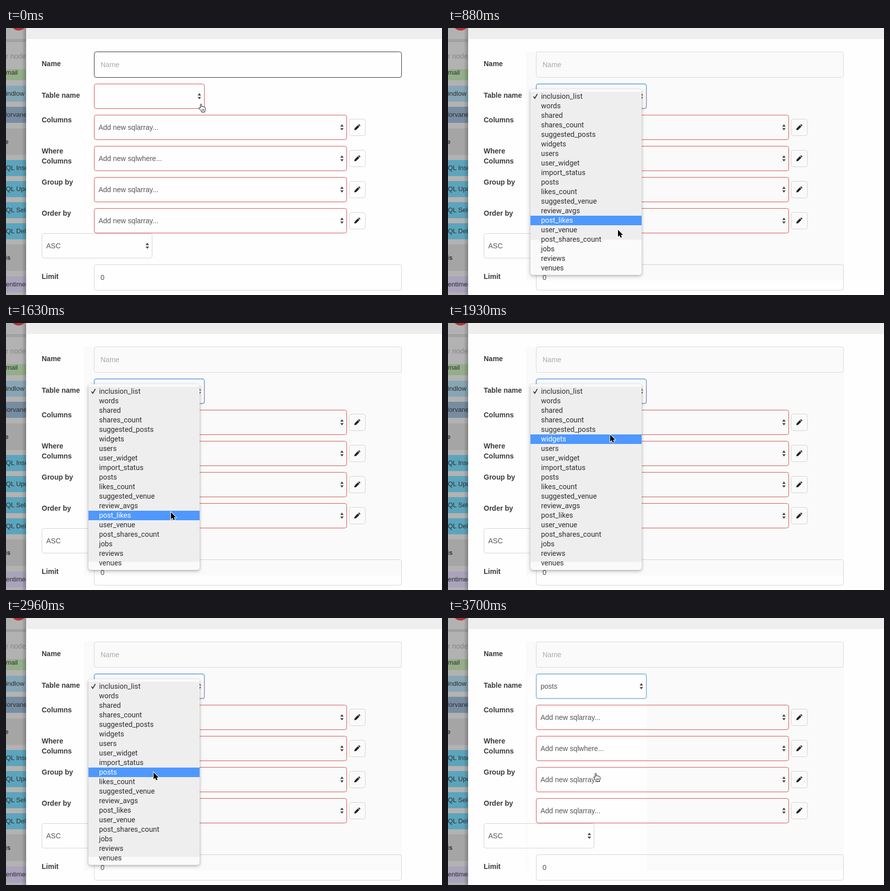
These frames come from a looping animation (867x532 px, 3.84 s). An HTML page:

```html
<!DOCTYPE html>
<html lang="en">
<head>
<meta charset="utf-8">
<title>Choosing a table</title>
<style>
  html, body { margin: 0; width: 100%; height: 100%; overflow: hidden; background: #fefefe; }
  svg { display: block; width: 867px; height: 532px; font: 14px "Liberation Sans", Arial, sans-serif; }
  text { white-space: pre; }
  .label { font-weight: bold; fill: #3a3a3a; }
  .value { fill: #555; }
  .hint { fill: #aaa; }
  .side { font-size: 13px; fill: #2e2e2e; }
  .head { font-size: 13px; font-weight: bold; fill: #2e2e2e; text-anchor: end; }
  .box { fill: none; stroke: #d3d3d3; }
  .need { stroke: #d5514e; }
  #menu text { font: 14.3px Roboto, Inter, sans-serif; fill: #2f2f2f; }
  #menu text.on { fill: #fff; }
  #sheet { filter: drop-shadow(0 2px 3px rgba(0, 0, 0, .32)); }
</style>
</head>
<body>
<svg viewBox="0 0 867 532">
  <defs>
    <linearGradient id="edge"><stop offset="0" stop-opacity="0"/><stop offset="1" stop-opacity=".22"/></linearGradient>
    <clipPath id="sideClip"><rect width="40" height="532"/></clipPath>
    <clipPath id="sheetClip"><rect x="164" y="122" width="221" height="370" rx="5"/></clipPath>
    <path id="updown" d="M-3.4-1.6h6.8L0-6.2zM-3.4 1.4h6.8L0 6z" fill="#444"/>
    <path id="pencil" d="M-5.5 5.5l.8-3.6L1.7-4.5l3 3L-1.8 5zM2.5-5.2l1-.9q.6-.5 1.2 0l1.6 1.6q.6.6 0 1.2l-.9 1z" fill="#222"/>
  </defs>

  <g id="sidebar" clip-path="url(#sideClip)">
    <rect width="40" height="532" fill="#b2b2b2"/>
    <rect y="22" width="40" height="6" fill="#a1a1a1"/>
    <circle cx="25" cy="-11" r="16" fill="#b4343a"/>
    <text y="61" fill="#858585">r nodes</text>
  </g>
  <rect x="31" width="9" height="532" fill="url(#edge)"/>

  <rect x="40" width="827" height="532" fill="#fefefe"/>
  <rect x="40" width="827" height="22" fill="#eee"/>
  <rect id="tint" x="155" y="47" width="632" height="456" fill="#fafafa"/>
  <rect id="cleared" x="158" y="115" width="237" height="388" fill="#fefefe"/>
  <g id="form"></g>
  <rect id="nameBox" class="box" x="175.5" y="47.5" width="611" height="51" rx="4"/>
  <rect id="tableBox" class="box" x="175.5" y="111.5" width="219" height="49" rx="4"/>
  <path id="tableEdge" d="M394.5 126v31q0 3.500-4 3.500H180" fill="none" stroke="#9a76a3"/>
  <use href="#updown" x="384.500" y="136"/>
  <text id="tableValue" class="value" x="184" y="141">posts</text>

  <g id="menu">
    <rect id="sheet" x="164" y="122" width="221" height="370" rx="5" fill="#fafafa"/>
    <g clip-path="url(#sheetClip)">
      <rect id="shade" x="164" y="127" width="221" fill="#eee"/>
      <rect id="bar" x="164" width="221" height="19" fill="#4f98fd"/>
    </g>
    <path id="tick" d="M170 136.500l2.600 3.600 5-8.600" fill="none" stroke-width="1.700"/>
  </g>

  <g id="arrow">
    <path d="M0 0V14l3.200-3 2 4.800 2.500-1-2-4.600h4.300z" stroke="#fff" stroke-width="2" paint-order="stroke"/>
  </g>
  <g id="hand" fill="#fff" stroke="#111">
    <path d="M3.500 1.700Q3.500.5 4.800.5 6 .5 6 1.800V6Q6 5 7.300 5 8.500 5 8.600 6.200 9 5.600 10 5.700 11 5.900 11.100 7q.5-.5 1.300-.2 1.100.4 1.100 1.700V11q0 2-1 3.500v2h-7V15Q4.500 13.500 3 11.800L.8 9Q.3 8 1.200 7.500 2.300 7.200 3.500 8.800z"/>
    <path d="M3.500 8V2M6.500 10.500v3.500M8.500 10.500v3.500M10.500 10.500v3.500" stroke-width=".8"/>
  </g>
</svg>
<script>
const LOOP = 3840, OPEN = 290, FADE = 3400, GONE = 3550, PICKED = 3700;
const ROW = 19, TOP = 127;
const $ = id => document.getElementById(id);

function add(parent, tag, attrs, content) {
  const node = document.createElementNS("http://www.w3.org/2000/svg", tag);
  for (const key in attrs) node.setAttribute(key, attrs[key]);
  if (content) node.textContent = content;
  parent.append(node);
  return node;
}
const write = (parent, cls, x, y, content) => add(parent, "text", { class: cls, x, y }, content);
const box = (x, y, width, height, cls = "box") =>
  add($("form"), "rect", { class: cls, x: x + .5, y: y + .5, width, height, rx: 4 });
const icon = (name, x, y) => add($("form"), "use", { href: "#" + name, x, y });

// Sidebar
const side = $("sidebar");
function card(y, height, fill, title, baseline) {
  add(side, "rect", { y, width: 40, height, fill });
  write(side, "side", -9, baseline, title);
}
function heading(y, title, right) {
  add(side, "rect", { y, width: 40, height: 53, fill: "#a5a5a5" });
  write(side, "head", right, y + 31, title);
}
card(82, 22, "#94ae89", "Email", 93);
card(115, 32, "#87a6b4", "Pindlow", 135);
card(157, 32, "#778ca1", "Morvanel", 177);
heading(200, "Database", 5);
["Insert", "Update", "Select", "Delete"].forEach((verb, i) =>
  card(263 + 42 * i, 32, "#5ca4bc", "SQL " + verb, 283 + 42 * i));
heading(431, "Analysis", 9);
card(495, 32, "#aaa3bb", "Sentiment", 515);

// Form
const form = $("form");
[["Name", 76], ["Table name", 139], ["Columns", 188], ["Where", 250], ["Columns", 270],
 ["Group by", 312], ["Order by", 374], ["Limit", 500]]
  .forEach(([title, y]) => write(form, "label", 71, y, title));
write(form, "hint", 188, 78, "Name");
["array", "where", "array", "array"].forEach((kind, i) => {
  const y = 173 + 62 * i;
  box(175, y, 502, 49, "box need");
  write(form, "value", 184, y + 30, `Add new sql${kind}...`);
  icon("updown", 668, y + 25);
  box(682, y + 8, 32, 33);
  icon("pencil", 698, y + 25);
});
box(71, 409, 219, 49);
write(form, "value", 80, 439, "ASC");
icon("updown", 281, 434);
box(175, 471, 611, 51);
write(form, "value", 188, 502, "0");

// Menu
const items = ("inclusion_list words shared shares_count suggested_posts widgets users user_widget " +
  "import_status posts likes_count suggested_venue review_avgs post_likes user_venue " +
  "post_shares_count jobs reviews venues").split(" ")
  .map((name, i) => write($("menu"), "", 185, TOP + 14 + ROW * i, name));

// Pointer steps: time, x, y, highlighted row
const steps = [
  [0, 383, 151, 0], [150, 384, 152, 0], [590, 376, 147, 1], [740, 267, 170, 1],
  [880, 338, 402, 13], [1030, 333, 446, 16], [1330, 331.500, 455, 17], [1480, 330, 441, 16],
  [1630, 328, 377, 13], [1780, 325, 268, 8], [1930, 322.500, 222.500, 5], [2070, 318, 195, 3],
  [2220, 312, 171, 2], [2370, 302.500, 259.500, 5], [2520, 296, 344, 11], [2670, 291, 325, 10],
  [2810, 290, 315, 9], [2960, 293.500, 307.500, 9], [PICKED, 289, 309, 9]
];
// The menu's grey ground grows downward: time, bottom edge
const shades = [[0, 127], [590, 169], [880, 422], [1030, 464], [1330, 476]];
const latest = (list, t) => list.findLast(entry => entry[0] <= t);
const show = (id, on) => $(id).style.display = on ? "" : "none";

function draw(now) {
  const t = now % LOOP;
  const [, x, y, row] = latest(steps, t);
  const isHand = t < 590 || t >= PICKED;
  show("hand", isHand);
  show("arrow", !isHand);
  $(isHand ? "hand" : "arrow").setAttribute("transform", `translate(${x} ${y})`);

  show("tint", t >= OPEN);
  show("cleared", t >= FADE);
  $("nameBox").style.stroke = t < OPEN ? "#333" : "#d8d8d8";
  $("tableBox").style.stroke = t < OPEN ? "#d5514e" : t < PICKED ? "#5a98dc" : "#72aadb";
  $("tableBox").style.strokeWidth = t < OPEN ? 1 : 1.4;
  show("tableEdge", t >= OPEN && t < PICKED);
  show("tableValue", t >= PICKED);

  show("menu", t >= OPEN && t < GONE);
  $("menu").style.opacity = t < FADE ? 1 : .3;
  $("shade").setAttribute("height", latest(shades, t)[1] - TOP);
  $("bar").setAttribute("y", TOP + ROW * row);
  $("tick").style.stroke = row ? "#2f2f2f" : "#fff";
  items.forEach((item, i) => item.classList.toggle("on", i === row));
}
function frame() {
  draw(performance.now());
  requestAnimationFrame(frame);
}
frame();
</script>
</body>
</html>
```
